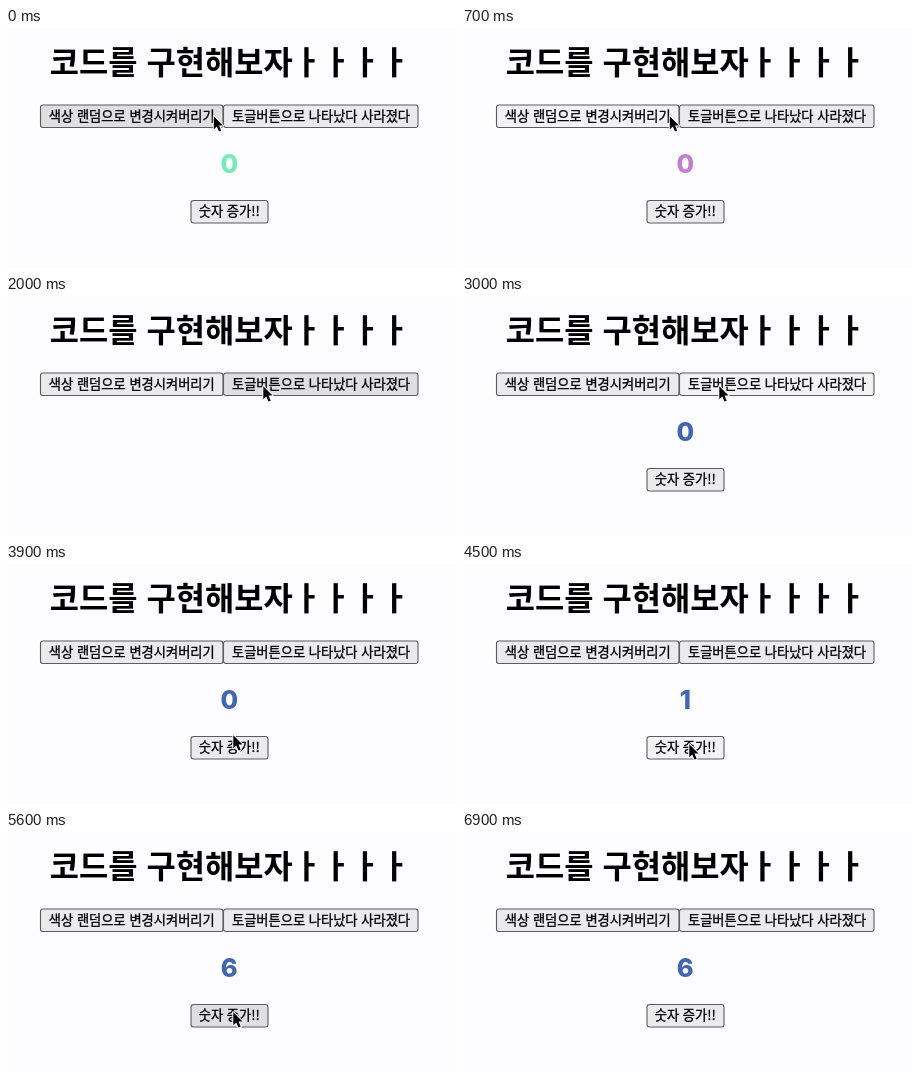
Animation of 450 by 240 pixels, one loop 7000 ms. Source, as an HTML page:

```html
<!DOCTYPE html>
<html lang="ko">
<head>
<meta charset="utf-8">
<style>
  html, body { margin: 0; width: 100%; height: 100%; overflow: hidden; background: #fdfcfe; }
  svg { display: block; width: 450px; height: 240px; }
  text { text-anchor: middle; font-family: "Noto Sans CJK KR", "Noto Sans CJK", sans-serif; }
  .title { font-size: 31.8px; font-weight: 700; }
  .button text { font-size: 13.25px; stroke: #000; stroke-width: .3; }
  .button rect { stroke: #5c5b5d; stroke-width: 1.1; }
  #count { font: 800 25.5px Inter, sans-serif; }
</style>
</head>
<body>
<svg viewBox="0 0 450 240">
  <text class="title" x="223.8" y="46">코드를 구현해보자ㅏㅏㅏㅏ</text>
  <g class="button">
    <rect x="34.5" y="77" width="182.5" height="22.5" rx="2.5"/>
    <text x="125.8" y="92.7">색상 랜덤으로 변경시켜버리기</text>
  </g>
  <g class="button">
    <rect x="217.5" y="77" width="194.5" height="22.5" rx="2.5"/>
    <text x="315" y="92.7">토글버튼으로 나타났다 사라졌다</text>
  </g>
  <g id="panel">
    <text id="count" x="223.3" y="145.3"></text>
    <g class="button">
      <rect x="185" y="172.5" width="77" height="22.5" rx="2.5"/>
      <text x="223.3" y="188.3">숫자 증가!!</text>
    </g>
  </g>
  <path id="cursor" d="M.8 1.2V14.2L3.8 11.4L6 16.6L8.2 15.7L6 10.6H10Z"
        stroke="#fff" stroke-width="2" stroke-linejoin="round" paint-order="stroke"/>
</svg>
<script>
const LOOP = 7000, STEP = 100, POINTER_GONE = 6600;
const FILL = { idle: '#ebeaec', hover: '#dfdee0', active: '#f3f2f4' };
const COLORS = ['#73ecb6', '#b5c95c', '#c27fd0', '#d98a5f', '#6183c1', '#4266b2'];

const easeOut = k => 1 - (1 - k) ** 2;
const easeIn = k => k * k;

const HOME = { x: 207, y: 87 };
const MOVES = [
  { from: 1300, to: 1600, x: 256.5, y: 89, ease: easeOut },
  { from: 3500, to: 3900, x: 226.5, y: 170, ease: easeOut },
  { from: 3900, to: 4200, x: 226.5, y: 179, ease: easeOut },
  { from: 6000, to: 6500, x: 51, y: 190, ease: easeIn }
];

// Evenly spaced clicks, each held down for a moment
const burst = (start, count, every, hold = 90) =>
  Array.from({ length: count }, (_, i) => ({ down: start + i * every, up: start + i * every + hold }));

const recolor = burst(150, 5, 245);
const toggle = [...burst(1850, 2, 700), ...burst(2950, 2, 400)];
const increase = [...burst(4150, 1, 0), ...burst(4500, 5, 230, 140)];

const byId = id => document.getElementById(id);
const panel = byId('panel'), count = byId('count'), cursor = byId('cursor');
const buttons = [...document.querySelectorAll('.button rect')];

function pointerAt(t) {
  return MOVES.reduce((p, move) => {
    const k = move.ease(Math.min(1, Math.max(0, (t - move.from) / (move.to - move.from))));
    return { x: p.x + (move.x - p.x) * k, y: p.y + (move.y - p.y) * k };
  }, HOME);
}

function contains(rect, { x, y }) {
  const [left, top, w, h] = ['x', 'y', 'width', 'height'].map(name => +rect.getAttribute(name));
  return x >= left && x < left + w && y >= top && y < top + h;
}

function render(time) {
  const t = Math.floor(time % LOOP / STEP) * STEP;
  const pointer = pointerAt(t), present = t < POINTER_GONE;
  const done = clicks => clicks.filter(c => c.up <= t).length;
  const held = clicks => clicks.some(c => c.down <= t && t < c.up);

  [recolor, toggle, increase].forEach((clicks, i) => {
    const hovered = present && contains(buttons[i], pointer);
    buttons[i].setAttribute('fill', FILL[held(clicks) ? 'active' : hovered ? 'hover' : 'idle']);
  });
  count.setAttribute('fill', COLORS[done(recolor)]);
  panel.setAttribute('visibility', done(toggle) % 2 ? 'hidden' : 'visible');
  count.textContent = done(increase);

  cursor.setAttribute('visibility', present ? 'visible' : 'hidden');
  cursor.setAttribute('transform', `translate(${pointer.x} ${pointer.y})`);
}

const start = performance.now();
function tick() {
  render(performance.now() - start);
  requestAnimationFrame(tick);
}
tick();
</script>
</body>
</html>
```
